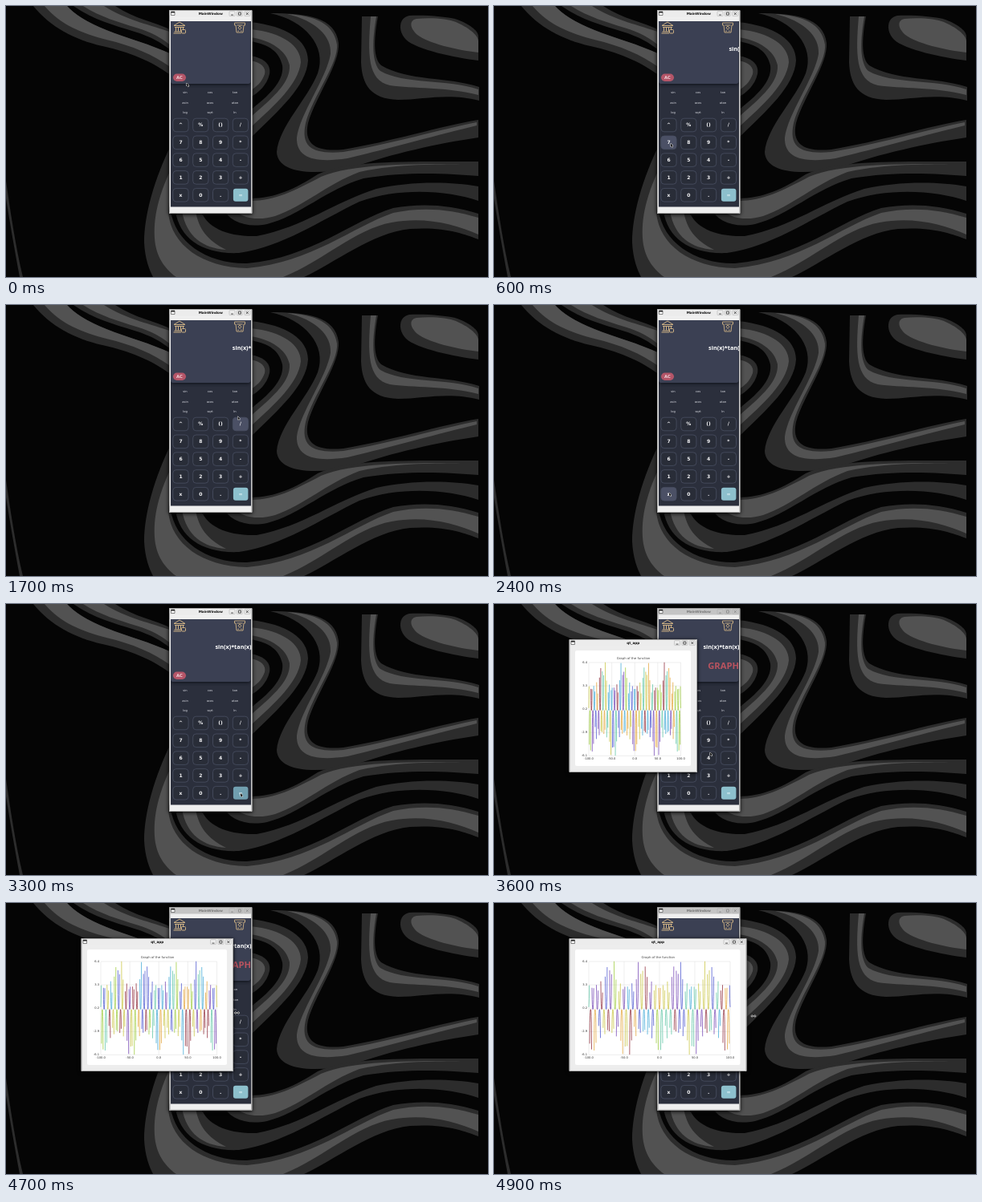
These frames come from a looping animation (600x338 px, 5000 ms). An HTML page with a canvas:

```html
<!DOCTYPE html>
<html lang="en">
<head>
<meta charset="utf-8">
<title>Calculator</title>
<style>
html, body { margin: 0; width: 100%; height: 100%; overflow: hidden; background: #050505; }
canvas { display: block; width: 600px; height: 338px; }
</style>
</head>
<body>
<canvas id="stage" width="600" height="338"></canvas>
<script>
const ctx = document.getElementById('stage').getContext('2d');
const LOOP = 5000, STEP = 100;
const SANS = '"DejaVu Sans", sans-serif', DISPLAY = '"Noto Sans", "Open Sans", sans-serif';
const DARK = '#2c2c2c', LIGHT = '#525252';

const wallpaper = [
  // upper left bands and their turn on the right
  [DARK, 'M34,0C55,26 85,42 120,50C155,58 180,68 206,87V60C180,48 150,40 125,30C100,20 85,10 76,0Z'],
  [LIGHT, 'M48,0C68,24 95,34 125,42C158,50 182,60 206,77V60C180,48 150,40 125,30C100,20 85,10 76,0Z'],
  [DARK, 'M84,0C110,18 135,24 160,32C180,38 194,46 206,56V30C185,20 160,16 136,0Z'],
  [LIGHT, 'M96,0C118,14 140,20 162,27C182,33 194,40 206,50V33C182,24 150,18 122,0Z'],
  [DARK, 'M304,20C350,25 376,43 376,68C374,100 340,130 304,165V130C335,106 346,90 344,74C340,57 328,48 304,44Z'],
  [LIGHT, 'M304,29C345,33 367,50 367,70C364,98 335,123 304,152V139C335,112 354,95 353,74C349,55 330,43 304,39Z'],
  [DARK, 'M304,62C322,65 330,73 328,85C325,98 315,108 304,114Z'],
  [LIGHT, 'M304,68C318,70 324,77 322,85C318,96 312,100 304,106Z'],
  // long S curve
  [DARK, 'M329,9C375,9 410,14 414,46C416,72 386,112 376,146C370,174 388,182 420,179C480,169 540,150 588,142V164C540,171 480,184 430,202C380,212 338,208 337,182C340,150 376,115 388,84C400,50 372,18 329,9Z'],
  [LIGHT, 'M350,10C385,12 408,22 412,48C414,72 382,112 373,146C366,178 384,185 420,182C480,172 540,154 586,145V149C540,160 480,177 425,190C385,196 361,190 362,164C366,134 399,90 404,60C406,38 385,18 350,10Z'],
  // upper right hook and blob
  [DARK, 'M443,13H463C457,45 458,66 467,74C500,94 550,88 589,101V118C550,108 520,117 488,117C454,116 443,98 442,70Z'],
  [LIGHT, 'M461,13C455,47 456,72 466,81C495,98 550,91 588,104V111C550,101 505,103 478,99C450,93 450,60 454,13Z'],
  [DARK, 'M502,12C520,11 550,13 562,17C575,22 588,30 588,38V68C560,65 510,54 498,42C488,32 488,15 502,12Z'],
  [LIGHT, 'M511,16C530,14 550,16 560,20C574,26 588,36 588,44V58C560,55 525,46 512,36C503,28 501,18 511,16Z'],
  // lower waves
  [DARK, 'M268,250C278,270 300,277 325,272C365,262 400,228 445,215C500,206 550,209 588,212V194C500,194 425,192 388,210C360,228 335,240 304,240Z'],
  [LIGHT, 'M280,250C292,266 315,268 335,262C370,250 400,222 440,207C490,196 540,198 566,197C500,197 430,197 392,213C360,230 335,243 304,243Z'],
  [DARK, 'M211,256C216,290 245,310 290,308C345,300 390,268 440,244C490,226 550,230 588,243V225C550,218 500,219 461,228C410,244 370,276 312,287C275,288 250,276 243,256Z'],
  [LIGHT, 'M219,256C225,288 245,302 274,304C250,292 240,278 236,256Z'],
  [DARK, 'M206,172C185,215 172,260 172,295C173,315 178,328 183,338H371C410,320 455,283 503,278C545,275 570,284 588,291V259C550,247 515,246 482,252C430,268 380,314 300,321C250,322 210,294 205,255Z'],
  [LIGHT, 'M206,202C188,240 182,270 186,298C190,319 202,331 212,338H345C395,318 435,278 480,270C520,262 560,272 588,285V264C550,252 515,251 482,258C430,276 380,320 300,327C244,326 206,298 202,258Z'],
  [DARK, 'M0,218C6,260 12,300 21,338H17C10,300 4,265 0,240Z'],
].map(([color, d]) => [color, new Path2D(d)]);

const keys = ['^ % () /', '7 8 9 *', '6 5 4 -', '1 2 3 +', 'x 0 . ='].flatMap((row, r) =>
  row.split(' ').map((label, c) => ({ label, x: 217.5 + c * 24.8, y: 148.5 + r * 21.8 })));
const functionRows = ['sin cos tan', 'asin acos atan', 'log sqrt ln'];

// [time, x, y] of the pointer
const pointer = [
  [0, 225, 96], [200, 223, 107], [400, 223, 108], [800, 217, 235], [900, 217, 236],
  [1100, 273, 160], [1200, 268, 149], [1300, 268, 149], [1500, 292, 170], [1600, 292, 170],
  [1800, 285, 108], [1900, 285, 108], [2300, 218, 234], [2500, 218, 234], [2800, 267, 149],
  [2900, 267, 149], [3200, 292, 236], [3400, 292, 236], [3600, 269, 185], [4000, 256, 140],
  [4400, 250, 133], [4500, 252, 133], [4900, 323, 141], [5000, 323, 141],
];
const typed = [
  [0, ''], [400, 'sin('], [900, 'sin(x'], [1300, 'sin(x)'], [1600, 'sin(x)*'],
  [1900, 'sin(x)*tan('], [2500, 'sin(x)*tan(x'], [2900, 'sin(x)*tan(x)'],
];
const GRAPH_OPENS = 3400;
const BRANCH_COLORS = ['#9ccb3b', '#e3a43a', '#7446b4', '#3fa9d6', '#8f2a38', '#4a55cf', '#5cc4a4', '#c9c540'];

function pointerAt(t) {
  const i = pointer.findIndex(p => p[0] > t);
  const [t0, x0, y0] = pointer[i - 1], [t1, x1, y1] = pointer[i];
  const k = (t - t0) / (t1 - t0), ease = k * k * (3 - 2 * k);
  return [x0 + (x1 - x0) * ease, y0 + (y1 - y0) * ease];
}

function box(x, y, w, h, fill, radius = 0, stroke) {
  ctx.beginPath();
  ctx.roundRect(x, y, w, h, radius);
  if (fill) { ctx.fillStyle = fill; ctx.fill(); }
  if (stroke) { ctx.strokeStyle = stroke; ctx.stroke(); }
}

function text(s, x, y, size, color, { bold = true, align = 'center', family = SANS } = {}) {
  ctx.font = `${bold ? 'bold ' : ''}${size}px ${family}`;
  ctx.textAlign = align;
  ctx.textBaseline = 'middle';
  ctx.fillStyle = color;
  ctx.fillText(s, x, y);
}

function line(d, color, width = 1) {
  ctx.strokeStyle = color;
  ctx.lineWidth = width;
  ctx.stroke(new Path2D(d));
}

function windowFrame(x, y, w, h, title, active) {
  ctx.save();
  ctx.shadowColor = '#000';
  ctx.shadowBlur = 5;
  ctx.shadowOffsetY = 1;
  box(x, y, w, h, active ? '#ececec' : '#c4c4c4', 1);
  ctx.restore();
  ctx.lineWidth = .7;
  box(x + .5, y + .5, w - 1, h - 1, null, 1, '#888');
  const ink = active ? '#111' : '#777';
  box(x + 2.5, y + 2, 4.5, 4.5, '#fff', 0, '#555');
  box(x + 2.5, y + 2, 4.5, 1.5, '#222');
  text(title, x + w / 2, y + 4.6, 4.2, ink);
  for (let i = 0; i < 3; i++) {
    const cx = x + w - 25 + i * 9.4, cy = y + 4.6;
    ctx.lineWidth = .5;
    box(cx - 3.5, cy - 3, 7, 6, null, 1, '#aaa');
    const glyph = ['m-1.5,1.5h3', 'm-1.5,-1.5h3v3h-3z', 'm-1.5,-1.5l3,3m0,-3l-3,3'][i];
    line(`M${cx},${cy}${glyph}`, ink, .7);
  }
}

function icons() {
  const gold = '#cdb184';
  line('M209,24.5L216,20L223,24.5ZM210,26.5H222M211.5,27V31.5M214.5,27V31.5M217.5,27V31.5M220.5,27V29M209.5,32H218M208.5,34H218', gold, 1);
  box(218.5, 29.5, 5, 4.5, '#3b4052', 1, gold);
  line('M284.5,21H297.5V24H296L295,33H287L286,24H284.5Z', gold, .9);
  line('M287.5,24H294.5M291,25l2,2.2l-2,2.2l-2,-2.2zM288.5,31.2H290M292,31.2H293.5', gold, .9);
}

function calculator(t, hover) {
  const open = t >= GRAPH_OPENS;
  windowFrame(203, 5, 103.5, 254, 'MainWindow', !open);
  box(205, 13.5, 100, 244, '#efefef');
  box(205, 19, 100, 231.5, '#2b2f3c');
  ctx.save();
  ctx.beginPath();
  ctx.rect(205, 19, 100, 231.5);
  ctx.clip();
  ctx.shadowColor = '#0d1018';
  ctx.shadowBlur = 4;
  ctx.shadowOffsetY = 1;
  box(205, 12, 99.5, 85, '#3b4053', 3);
  ctx.shadowColor = 'transparent';
  icons();
  box(208, 84.5, 16, 9.5, '#b45568', 4.7);
  text('AC', 216, 89.5, 5.2, '#f0d5db');
  const right = { align: 'right', family: DISPLAY };
  text(typed.findLast(k => k[0] <= t)[1], 305.5, 54, 7.25, '#fff', right);
  if (open) text('GRAPH', 305, 78, 11.2, '#b9535f', right);
  functionRows.forEach((row, r) => row.split(' ').forEach((name, c) =>
    text(name, 223 + c * 31, 108.2 + r * 12.4, 3.7, '#dfe1e8', { bold: false })));
  for (const key of keys) {
    const lit = key === hover;
    ctx.lineWidth = .8;
    if (key.label === '=') box(key.x - 9, key.y - 8, 18.5, 16, lit ? '#719fb0' : '#8dc0cd', 3);
    else box(key.x - 9.6, key.y - 8.3, 19.2, 16.6, lit ? '#4b5065' : '#292d38', 4, '#4a5062');
    text(key.label, key.x, key.y + .3, 6, key.label === '=' ? '#d9edf2' : '#f4f4f6');
  }
  ctx.restore();
}

function hash(n) {
  const v = Math.sin(n * 12.9898) * 43758.5453;
  return v - Math.floor(v);
}

function plot(left, right, seed) {
  const sx = x => left + (x + 100) / 200 * (right - left);
  const sy = y => 73 + (6.4 - y) / 12.5 * 116.5;
  ctx.lineWidth = .75;
  let sign = 0, branch = 0;
  ctx.beginPath();
  for (let x = -100; x <= 100; x += .25) {
    const y = Math.sin(x) * Math.tan(x);
    if (Math.abs(y) > 6.45) continue;
    const s = Math.sign(Math.cos(x));
    if (s !== sign) {
      ctx.stroke();
      ctx.beginPath();
      branch++;
      sign = s;
      ctx.strokeStyle = BRANCH_COLORS[Math.floor(hash(branch + seed * 71) * BRANCH_COLORS.length)];
    }
    ctx.lineTo(sx(x), sy(y));
  }
  ctx.stroke();
}

function graph(t) {
  const grow = Math.max(0, Math.min(4, (t - 4500) / 100));
  const edge = 253 + [0, 13, 30, 47, 61.5][grow];
  windowFrame(93.5, 44, edge - 93.5, 166, 'qt_app', true);
  box(96, 52.5, edge - 98.5, 155, '#ededed');
  box(101, 58, edge - 109, 144, '#fff', 2);
  const left = 118, right = edge - 20.5;
  text('Graph of the function', (94 + edge) / 2, 68, 3.9, '#444', { bold: false });
  for (let i = 0; i < 5; i++) {
    const x = left + (right - left) * i / 4, y = 73 + 29.1 * i;
    line(`M${x},73V189.5M${left},${y}H${right}`, '#e3e3e3', .6);
    text((-100 + 50 * i).toFixed(1), x, 193, 3.7, '#333', { bold: false });
    text(['6.4', '3.3', '0.2', '-2.9', '-6.1'][i], 116, y, 3.7, '#333', { bold: false, align: 'right' });
  }
  plot(left, right, grow);
}

function cursor(t, x, y) {
  if (t >= 4300) {
    const d = `M${x - 2.5},${y}h5m-1.2,-1.2l1.2,1.2l-1.2,1.2m-2.6,-2.4l-1.2,1.2l1.2,1.2`;
    line(d, '#ddd', 1.6);
    line(d, '#222', .6);
    return;
  }
  const arrow = new Path2D(`M${x},${y}v4l.9,-.8l.8,1.5l.8,-.4l-.8,-1.4h1.3z`);
  ctx.lineWidth = 1;
  ctx.strokeStyle = '#eee';
  ctx.stroke(arrow);
  ctx.fillStyle = '#111';
  ctx.fill(arrow);
}

function draw(t) {
  ctx.fillStyle = '#050505';
  ctx.fillRect(0, 0, 600, 338);
  for (const [color, path] of wallpaper) {
    ctx.fillStyle = color;
    ctx.fill(path);
  }
  const [x, y] = pointerAt(t);
  const hover = t < GRAPH_OPENS &&
    keys.find(k => Math.abs(k.x - x) < 9.8 && Math.abs(k.y - y) < 10.7);
  calculator(t, hover);
  if (t >= GRAPH_OPENS) graph(t);
  cursor(t, x, y);
}

const start = performance.now();
let shown = -1;
function tick() {
  const t = Math.floor((performance.now() - start) % LOOP / STEP) * STEP;
  if (t !== shown) draw(shown = t);
  requestAnimationFrame(tick);
}
tick();
</script>
</body>
</html>
```
